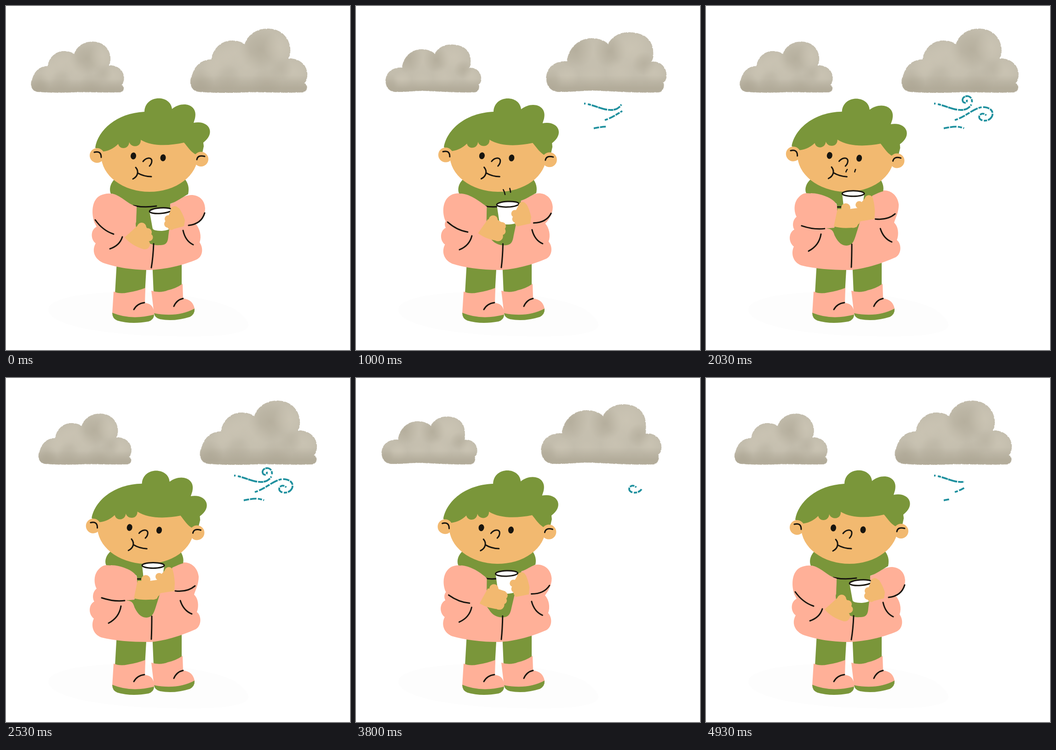
These frames come from a looping animation (748 px wide and 748 px high, 5010 ms). An HTML page with a canvas:

```html
<!DOCTYPE html>
<html>
<head>
<meta charset="utf-8">
<style>
html, body { margin: 0; height: 100%; overflow: hidden; background: #fff; }
canvas { display: block; width: 748px; height: 748px; }
</style>
</head>
<body>
<canvas id="stage" width="748" height="748"></canvas>
<script>
const ctx = document.getElementById('stage').getContext('2d');
const LOOP = 5010, LAST_STEP = 4930, DRIFT = 4050;
const GREEN = '#7a963a', PINK = '#ffb098', SKIN = '#f2b970', INK = '#18150f', TEAL = '#1f909e';

const clamp = (v, lo = 0, hi = 1) => Math.max(lo, Math.min(hi, v));
const lerp = (a, b, k) => a + (b - a) * k;
const ease = u => 0.5 - 0.5 * Math.cos(Math.PI * clamp(u));

// Blend two path strings that share the same commands
function mix(a, b, k) {
  const to = b.match(/-?[\d.]+/g);
  let i = 0;
  return a.replace(/-?[\d.]+/g, n => lerp(+n, +to[i++], k).toFixed(2));
}
function fill(d, color) {
  ctx.fillStyle = color;
  ctx.fill(new Path2D(d));
}
function line(d, color = INK, width = 3) {
  ctx.strokeStyle = color;
  ctx.lineWidth = width;
  ctx.stroke(new Path2D(d));
}
function oval(x, y, rx, ry, color, turn = 0) {
  ctx.beginPath();
  ctx.ellipse(x, y, rx, ry, turn, 0, 7);
  ctx.fillStyle = color;
  ctx.fill();
}
const dot = (x, y, r, color) => oval(x, y, r, r, color);

// Stroke only the stretch of a path between two lengths, broken into dashes
function trimmed(d, from, to, pattern, color, width) {
  const dash = [];
  let pos = 0, start = 0, end = 0;
  for (let i = 0; pos < to; i++) {
    const len = pattern[i % pattern.length];
    const a = Math.max(pos, from), b = Math.min(pos + len, to);
    if (i % 2 === 0 && b > a) {
      if (dash.length) dash.push(a - end); else start = a;
      dash.push(b - a);
      end = b;
    }
    pos += len;
  }
  if (!dash.length) return;
  ctx.setLineDash([...dash, 9999]);
  ctx.lineDashOffset = -start;
  line(d, color, width);
  ctx.setLineDash([]);
  ctx.lineDashOffset = 0;
}

// ---- clouds -------------------------------------------------------------
const puffy = w => `M18 -1 C-2 -2 -4 -25 3 -36 C8 -55 22 -70 45 -70 C48 -95 68 -111 88 -111
  C100 -111 112 -108 117 -102 C${122 + w} -122 ${142 + w} ${w / 3 - 137} ${166 + w} ${w / 3 - 137}
  C${200 + w} -137 ${216 + w} -112 ${215 + w} -88 C${215 + w} -80 212 -75 209 -72
  C235 -74 252 -58 252 -38 C252 -28 249 -22 245 -19 C254 -17 254 -2 243 0
  C200 2 150 -1 120 0 C80 2 40 1 18 -1 Z`;
const flat = w => `M26 -1 C8 -2 0 -15 0 -32 C2 -55 20 -67 45 -66 C48 -95 70 -116 98 -116
  C115 -116 128 -110 134 -103 C142 -120 160 -129 178 -129 C${210 + w} -129 ${226 + w} -110 ${226 + w} -86
  C${227 + w} -78 ${226 + w} -70 226 -65 C250 -68 261 -50 260 -34 C260 -28 257 -23 253 -21
  C256 -16 255 -3 245 0 C200 2 150 -2 120 -3 C90 -6 60 0 26 -1 Z`;

const DARK = '152,144,124', LIGHT = '210,203,186';
// x, y, radius, tone, strength
const puffyShade = [
  [150, -92, 46, DARK, .3], [60, -70, 36, LIGHT, .4], [95, -85, 34, LIGHT, .4], [192, -98, 34, LIGHT, .45],
  [120, -55, 34, LIGHT, .3], [225, -45, 28, LIGHT, .4], [20, -22, 30, DARK, .25], [80, -30, 30, DARK, .15],
  [195, -50, 26, DARK, .15], [165, -20, 34, DARK, .15], [45, -48, 26, LIGHT, .25]
];
const flatShade = [
  [62, -92, 40, DARK, .32], [138, -88, 36, DARK, .32], [185, -95, 42, LIGHT, .5], [100, -85, 34, LIGHT, .25],
  [212, -62, 26, DARK, .25], [235, -42, 24, LIGHT, .4], [45, -32, 26, LIGHT, .45], [100, -38, 30, LIGHT, .25],
  [160, -44, 32, LIGHT, .35], [8, -25, 26, DARK, .2]
];

function cloud(x, scale, d, shade) {
  const path = new Path2D(d);
  ctx.save();
  ctx.translate(x, 187);
  ctx.scale(scale, scale);
  ctx.fillStyle = ctx.strokeStyle = '#c3bdad';
  ctx.fill(path);
  ctx.lineWidth = 2;
  ctx.setLineDash([3, 2, 1, 4, 5, 2]);
  ctx.stroke(path);
  ctx.clip(path);
  for (const [cx, cy, r, tone, alpha] of shade) {
    const g = ctx.createRadialGradient(cx, cy, 0, cx, cy, r);
    g.addColorStop(0, `rgba(${tone},${alpha})`);
    g.addColorStop(.5, `rgba(${tone},${alpha * .6})`);
    g.addColorStop(1, `rgba(${tone},0)`);
    ctx.fillStyle = g;
    ctx.fillRect(cx - r, cy - r, 2 * r, 2 * r);
  }
  const base = ctx.createLinearGradient(0, -36, 0, -8);
  base.addColorStop(0, `rgba(${DARK},0)`);
  base.addColorStop(1, `rgba(${DARK},.38)`);
  ctx.fillStyle = base;
  ctx.fillRect(-5, -40, 275, 45);
  ctx.restore();
}

function clouds(t) {
  const sway = Math.cos(2 * Math.PI * t / DRIFT);
  const isFlat = Math.floor(t / 1000) % 2 === 1;
  const wobble = Math.floor(t / 200) % 4 === 1 ? 5 : 0;
  const d = (isFlat ? flat : puffy)(wobble);
  const shade = isFlat ? flatShade : puffyShade;
  cloud(65 - 9.5 * sway, .795, d, shade);
  cloud(414.5 - 12.2 * sway, 1, d, shade);
}

// ---- wind ---------------------------------------------------------------
const gusts = [
  { d: 'M496 212 C520 215 535 227 557 226 C574 225 583 210 576 200 C570 192 556 197 558 206 C560 213 569 211 567 204',
    on: 510, off: 2720, speed: .18, dash: [3, 5, 7, 2, 14, 1, 20, 2, 11, 1, 16, 2] },
  { d: 'M541 248 C563 242 582 222 600 220 C624 219 628 236 618 245 C610 252 595 250 594 242 C594 233 606 232 609 238',
    on: 750, off: 3190, speed: .17, dash: [7, 3, 14, 2, 10, 2, 18, 2] },
  { d: 'M517 266 C530 264 545 259 561 266', on: 780, off: 3060, speed: .12, dash: [12, 2, 14, 3, 9, 3] }
];
function wind(t) {
  ctx.lineCap = 'butt';
  for (const time of [t, t - DRIFT])
    for (const g of gusts)
      trimmed(g.d, Math.max(0, (time - g.off) * g.speed), Math.min(170, (time - g.on) * g.speed), g.dash, TEAL, 3.8);
  ctx.lineCap = 'round';
}

// ---- character ----------------------------------------------------------
function legs() {
  fill('M92 660 C95 610 400 610 495 658 C540 690 550 712 440 718 C280 722 95 705 92 660 Z', '#fdfdfd');
  fill('M241 555 H306 L302 625 H237 Z M318 555 H382 V615 L321 625 Z', GREEN);
  fill('M234 621 Q248 627 265 623 Q285 620 303 613 L302 646 Q318 646 322 664 V672 Q270 692 231 669 Z', PINK);
  fill('M316 619 Q335 625 352 618 Q370 614 384 604 L385 636 Q406 638 410 658 L409 662 Q370 684 322 670 Z', PINK);
  fill('M231 667 Q272 684 322 671 Q322 682 310 686 Q272 693 242 684 Q231 680 231 667 Z', GREEN);
  fill('M322 668 Q372 678 410 658 Q411 670 400 676 Q365 687 335 681 Q323 678 322 668 Z', GREEN);
  line('M278 660 Q285 647 301 645 M365 653 Q371 639 385 636');
}

function body(p) {
  fill(mix(
    `M205 412 C182 424 187 462 194 474 C195 476 196 478 197 480 C183 487 184 508 195 516
     C187 530 190 548 210 558 C235 567 270 574 312 574 C345 573 385 564 415 551 C429 544 429 525 421 514
     C426 500 421 484 413 474 C425 466 433 455 433 440 C432 420 418 411 403 411 C385 412 380 420 358 430
     L284 436 C262 430 250 410 228 408 C220 407 212 409 205 412 Z`,
    `M210 409 C188 422 191 447 197 458 C187 466 188 480 192 486 C179 493 179 514 191 523
     C184 538 189 557 207 564 C235 571 270 574 312 574 C340 573 380 561 413 546 C426 538 425 516 415 509
     C420 496 418 479 409 471 C412 461 419 448 419 432 C417 412 402 401 388 401 C372 402 366 408 362 412
     L284 436 C284 420 250 407 228 407 C220 406 214 407 210 409 Z`, p), PINK);
  // scarf
  fill(mix(
    `M238 375 C224 387 225 402 228 408 C245 409 255 425 276 434 L284 437 L282 475 C283 490 290 500 300 508
     C306 516 322 521 334 520 C348 520 352 515 353 500 L357 470 L357 430 C372 425 380 418 396 409
     C399 395 396 385 388 375 Z`,
    `M230 375 C214 387 215 402 218 407 C240 408 265 414 284 430 L285 437 L262 484 C276 484 277 492 280 500
     C288 516 296 521 306 521 C318 520 321 512 325 500 L336 465 L362 412 C372 408 376 405 385 403
     C387 395 385 385 378 375 Z`, p), GREEN);
  line(mix('M277 434 Q300 439 327 435', 'M284 437 Q288 437 293 437', p));
  // near sleeve
  fill(mix('M228 408 C250 410 262 430 284 436 L283 470 L262 505 L215 490 L200 440 Z',
           'M228 407 C250 407 284 420 285 436 L285 468 L279 482 L230 486 L200 440 Z', p), PINK);
  line(mix('M194 465 Q210 488 234 496 M253 502 Q247 521 226 528 M385 488 Q390 511 407 519 M432 450 Q425 474 397 477 M321 517 Q320 545 316 569',
           'M208 478 Q235 487 258 484 M250 496 Q246 521 223 533 M379 484 Q386 506 404 513 M411 452 Q395 466 368 463 M317 518 Q317 545 316 568', p));
}

function cupAndHands(p) {
  const at = (ax, ay, bx, by, r) => dot(lerp(ax, bx, p), lerp(ay, by, p), r, SKIN);
  ctx.save();
  ctx.translate(lerp(336, 320, p), lerp(445, 407.5, p));
  ctx.rotate(lerp(-.07, 0, p));
  fill('M-24 0 L-20 37 Q-19 43 0 44 Q17 44 19 38 L24 0 Z', '#fff');
  oval(0, 0, 24, 6, '#fff');
  ctx.strokeStyle = INK;
  ctx.lineWidth = 3;
  ctx.stroke();
  ctx.restore();

  fill(mix('M258 503 L287 477 L304 479 L314 494 L308 515 L300 529 Q274 522 258 503 Z',
           'M278 479 L286 441 L314 441 L335 438 L334 468 L328 480 Q300 485 278 479 Z', p), SKIN);
  at(295, 481, 304, 438.5, 10);
  at(308, 492, 332, 456, 9);
  at(311, 503, 327, 467, 8.5);
  at(302, 518, 320, 471, 11);

  fill(mix('M360 438 L376 439 Q384 450 389 466 L387 479 L360 486 L350 465 Z',
           'M347 416 L363 419 Q366 430 367 446 L366 463 L335 468 L330 436 Z', p), SKIN);
  at(367, 444, 354, 420, 9);
  at(353, 463, 333, 432, 8);
  at(352, 474, 340, 445, 8);
  at(359, 479, 343, 456, 8);
}

function head(p) {
  ctx.save();
  ctx.translate(309 - 8.4 * p, 328);
  ctx.rotate(.03 * p);
  ctx.translate(-309, -328);
  oval(312, 325, 105, 79, SKIN);
  fill(`M194 308 C200 270 240 233 301 230 C302 192 358 192 361 224 C384 205 418 214 411 244 L408 254
    C440 247 458 275 429 297 L430 305 L427 319 Q418 325 411 322 C400 315 395 306 387 297
    C355 304 318 306 293 291 C294 308 272 309 268 296 C267 312 247 313 244 300 Q228 316 206 317 Z`, GREEN);
  dot(198, 325, 16, SKIN);
  dot(424, 333, 16, SKIN);
  line('M192 318 Q207 314 207 329 M415 334 Q417 323 432 327');
  oval(277, 326, 6, 7.5, INK, .15);
  oval(341.5, 330, 6, 7.5, INK, .15);
  line('M298 338 C305 329 317 328 317 337 Q317 343 312 348 M282 351 C290 360 286 371 276 376 M286 363 Q300 371 316 371');
  ctx.restore();
}

function steam(t, p) {
  const from = clamp((t - 1450) / 750), to = clamp((t - 800) / 650);
  const wisp = (d, len) => trimmed(d, from * len, to * len, [99, 1], INK, 2.6);
  ctx.save();
  ctx.translate(lerp(336, 320, p), lerp(445, 407, p));
  wisp('M-6 -21 C-8 -34 -16 -36 -16 -45 Q-16 -49 -13 -52', 36);
  wisp('M6 -26 C5 -36 0 -41 5 -52', 27);
  ctx.restore();
}

function draw() {
  const t = Math.min(performance.now() % LOOP, LAST_STEP);
  const lift = ease((2330 - Math.abs(t - 2505)) / 1980);
  ctx.fillStyle = '#fff';
  ctx.fillRect(0, 0, 748, 748);
  ctx.lineCap = 'round';
  ctx.lineJoin = 'round';
  clouds(t);
  wind(t);
  legs();
  body(lift);
  head(lift);
  cupAndHands(lift);
  steam(t, lift);
  requestAnimationFrame(draw);
}
draw();
</script>
</body>
</html>
```
